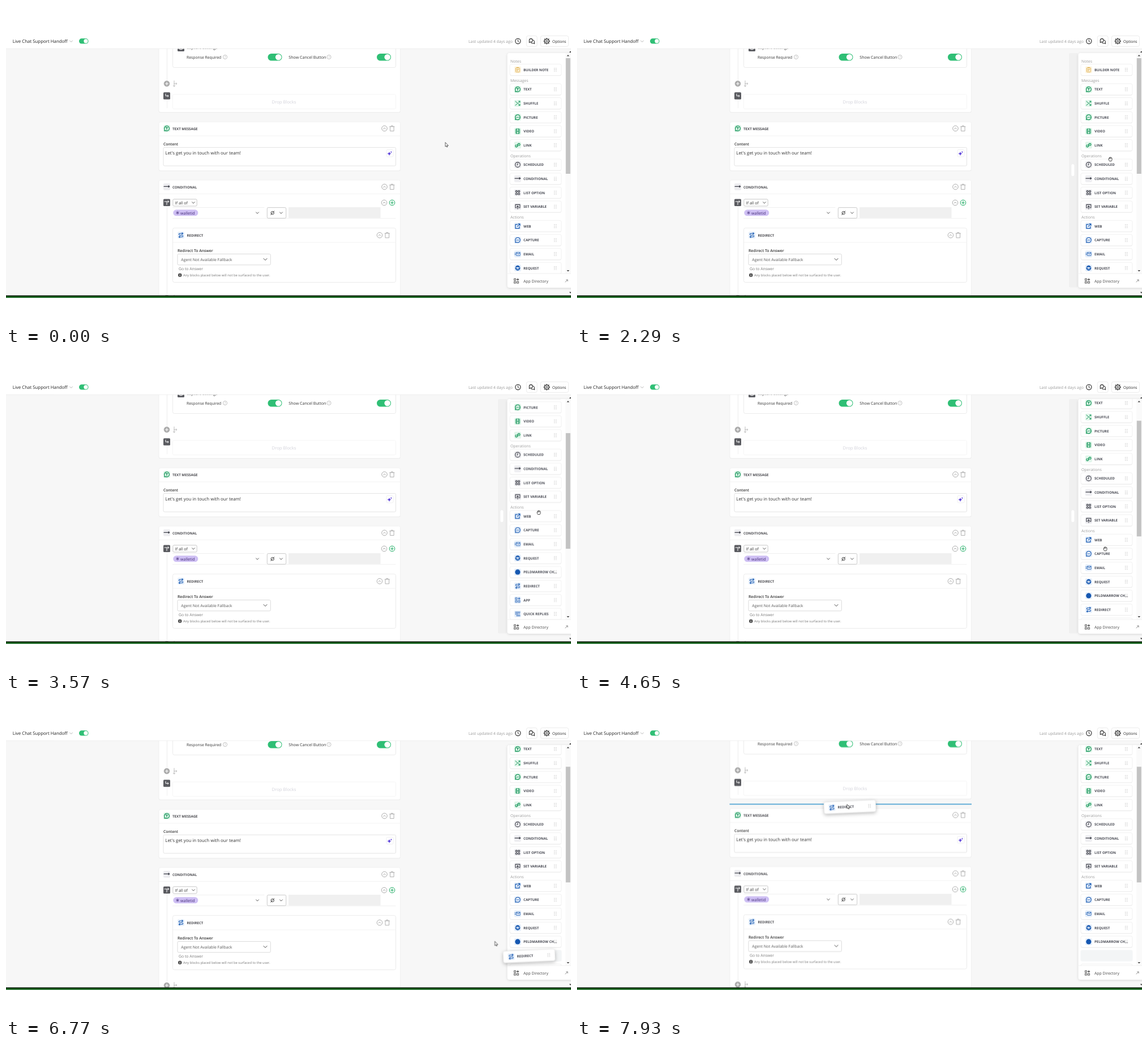
Recreate the animation shown at these times as an HTML page. Size 998 by 561 pixels, loop 8 s.

```html
<!DOCTYPE html>
<html lang="en">
<head>
<meta charset="utf-8">
<title>Flow builder</title>
<style>
  html, body { margin: 0; width: 100%; height: 100%; overflow: hidden; background: #fff; }
  svg { display: block; width: 100%; height: 100%; }
  text { font-family: "Open Sans", "Noto Sans", sans-serif; text-rendering: geometricPrecision; white-space: pre; }
  .line { fill: none; stroke-linecap: round; stroke-linejoin: round; }

  .anim { animation: 8s linear infinite; }
  .step { animation: 8s step-end infinite; }
  #page { animation-name: page; }
  #list { animation-name: list; }
  #thumb { animation-name: thumb; }
  #strip { animation-name: strip; }
  #grip { animation-name: grip; }
  #pointer { animation-name: pointer; }
  #ghost { animation-name: ghost; transform: translate(924px, 455px); }
  .arrow { animation-name: arrow; }
  .hand { animation-name: hand; }
  .grab { animation-name: grab; }
  .dragging { animation-name: dragging; }
  .resting { animation-name: resting; }
  #drop { animation-name: drop; }

  @keyframes page {
    0%, 83% { transform: translateY(0); }
    84%, 91% { transform: translateY(-8px); }
    92%, 100% { transform: translateY(-9.5px); }
  }
  @keyframes list {
    0%, 37% { transform: translateY(0); }
    38.125% { transform: translateY(-21px); }
    40%, 42.5% { transform: translateY(-57px); }
    44.625% { transform: translateY(-98.5px); }
    45.625%, 51.9% { transform: translateY(-114px); }
    54.4%, 100% { transform: translateY(-57px); }
  }
  @keyframes thumb {
    0%, 37% { transform: translateY(0); }
    38.125% { transform: translateY(10.8px); }
    40%, 42.5% { transform: translateY(29.3px); }
    44.625% { transform: translateY(51px); }
    45.625%, 51.9% { transform: translateY(59px); }
    54.4%, 100% { transform: translateY(29.3px); }
  }
  @keyframes strip {
    0%, 13% { opacity: 0; }
    14%, 83% { opacity: 1; }
    84%, 100% { opacity: 0; }
  }
  @keyframes grip {
    0%, 13.5% { opacity: 0; }
    15.1% { opacity: .5; }
    17%, 100% { opacity: 1; }
  }
  @keyframes pointer {
    0%, 3.125% { transform: translate(776px, 241px); animation-timing-function: ease-in-out; }
    14.5%, 16.5% { transform: translate(884px, 269px); animation-timing-function: ease-in-out; }
    24%, 39% { transform: translate(942px, 270px); }
    44.625%, 52% { transform: translate(941px, 283px); }
    58.125% { transform: translate(933px, 347px); }
    69%, 83% { transform: translate(921px, 452px); }
    84.625% { transform: translate(864px, 430px); }
    87.5% { transform: translate(740px, 355px); }
    91.25% { transform: translate(590px, 258px); }
    96.25%, 100% { transform: translate(477px, 188px); }
  }
  @keyframes ghost {
    0%, 84.8% { transform: translate(924px, 455px) rotate(-2.5deg); }
    88.5% { transform: translate(745px, 359px) rotate(-2.5deg); }
    92.25% { transform: translate(595px, 262px) rotate(-2.5deg); }
    97.25%, 100% { transform: translate(482px, 192px) rotate(-2.5deg); }
  }
  @keyframes arrow { 0% { opacity: 1; } 13.2% { opacity: 0; } 83.2%, 100% { opacity: 1; } }
  @keyframes hand { 0% { opacity: 0; } 13.2% { opacity: 1; } 18.5%, 100% { opacity: 0; } }
  @keyframes grab { 0% { opacity: 0; } 18.5% { opacity: 1; } 83.2%, 100% { opacity: 0; } }
  @keyframes dragging { 0% { opacity: 0; } 83.2%, 100% { opacity: 1; } }
  @keyframes resting { 0% { opacity: 1; } 83.2%, 100% { opacity: 0; } }
  @keyframes drop { 0% { opacity: 0; } 95%, 100% { opacity: 1; } }
</style>
</head>
<body>
<svg id="stage" viewBox="0 0 998 561" xmlns="http://www.w3.org/2000/svg"></svg>
<script>
const GREEN = '#16955a', BLUE = '#1557b0', DARK = '#3c3f48', GREY = '#9a9a9a';

const rect = (x, y, w, h, fill = '#fff', stroke = 'none', r = 0) =>
  `<rect x="${x}" y="${y}" width="${w}" height="${h}" rx="${r}" fill="${fill}" stroke="${stroke}" stroke-width=".8"/>`;
const dot = (x, y, r, fill, stroke = 'none', w = 1) =>
  `<circle cx="${x}" cy="${y}" r="${r}" fill="${fill}" stroke="${stroke}" stroke-width="${w}"/>`;
const line = (d, color = DARK, w = 1, fill = 'none') =>
  `<path class="line" d="${d}" stroke="${color}" stroke-width="${w}" style="fill:${fill}"/>`;
const text = (x, y, s, size, fill = '#333', weight = 400, anchor = 'start') =>
  `<text x="${x}" y="${y}" font-size="${size}" fill="${fill}" font-weight="${weight}" text-anchor="${anchor}">${s}</text>`;
const at = (x, y, body, attrs = '') => `<g transform="translate(${x} ${y})" ${attrs}>${body}</g>`;

// Glyphs are drawn around their own centre, about 10 units wide.
const bubble = 'M-4.2 4.2L-3.9 1.8A4.4 4.4 0 1 1 -1.8 3.9Z';
const squares = c => rect(-4, -4, 3, 3, 'none', c) + rect(-4, 1, 3, 3, 'none', c) +
  rect(1, 1, 3, 3, 'none', c) + line('M2.5 -4.2V-.8M.8 -2.5H4.2', c);
const glyphs = {
  note: c => rect(-3.5, -3.5, 7, 7.5, 'none', c, 1) + line('M-1.5 -4H1.5M-1.8 -.8H1.8M-1.8 1.5H.5', c),
  text: c => line(bubble, c, 1.2) + line('M-1.7 -1.6H1.7M0 -1.6V2', c, 1.2),
  shuffle: c => line('M-4 -3.5L4 3.5M-4 3.5L-1 1M1 -1L4 -3.5M1.8 -3.7H4V-1.6M1.8 3.7H4V1.6', c),
  picture: c => line(bubble, c, 1.2) + line('M-3.5 2L-1 -.5L.5 .8L2 -.6L4 .8', c),
  video: c => rect(-3.5, -4, 7, 8, 'none', c, 1) + line('M-1.8 -4V4M1.8 -4V4M-1.8 0H1.8', c, 1.2),
  link: c => line('M-.8 1.6A2 2 0 0 1 -.6 -1L1.5 -3.1A2 2 0 0 1 4 -.6L2.8 .7M.8 -1.6A2 2 0 0 1 .6 1L-1.5 3.1A2 2 0 0 1 -4 .6L-2.8 -.7', c, 1.2),
  clock: c => dot(0, 0, 4.4, 'none', c, 1.1) + line('M0 -2.4V.3H-1.6', c),
  cond: c => line('M-5 -.6H4.6M3 -2L4.8 -.6L3 .8', c, 1.2),
  list: c => [[-2.2, -2.2], [2.2, -2.2], [-2.2, 2.2], [2.2, 2.2]].map(([x, y]) => dot(x, y, 1.5, 'none', c, 1.2)).join(''),
  variable: c => line('M-1.8 2H-4V-3.6H4V2H1.8M0 4V-1.2M-1.5 .2L0 -1.4L1.5 .2', c, 1.1),
  web: c => line('M-.5 -3H-4V4H3V.8M1 -4H4V-1M4 -4L-.6 .6', c, 1.2),
  capture: c => line(bubble, c, 1.1) + [-1.9, 0, 1.9].map(x => dot(x, 0, .7, c)).join(''),
  email: c => rect(-2.5, -2.8, 6.8, 5.6, 'none', c, .6) + line('M-2.2 -2.4L.9 .2L4 -2.4M-5 -1.5H-3.8M-5 1H-3.8', c),
  request: c => dot(0, 0, 4.4, c) + line('M-3 -.8H3M-2 1.6H2', '#fff') + dot(0, -.6, 1.2, '#fff'),
  circle: c => dot(0, 0, 4.6, c),
  redirect: c => line('M-3.5 -1V-1.5A1.5 1.5 0 0 1 -2 -3H3.5M2 -4.4L3.6 -3L2 -1.6M3.5 1V1.5A1.5 1.5 0 0 1 2 3H-3.5M-2 1.6L-3.6 3L-2 4.4M-2.5 0H2.5', c, 1.1),
  app: squares,
  quick: c => line('M-4 -3H4M-4 0H1M-2 3H4', c, 1.3) + dot(3, 0, .8, c)
};
const badge = (x, y, name, color, tint) => at(x, y, rect(-6, -6, 12, 12, tint, 'none', 2) + glyphs[name](color));

const chevron = (x, y, color = '#444', s = 2.4) => line(`M${x - s} ${y - s / 2}l${s} ${s}l${s} ${-s}`, color, .9);
const help = (x, y) => dot(x, y, 3.6, 'none', '#aaa', .7) + text(x, y + 1.8, '?', 5, '#999', 400, 'middle');
const toggle = (x, y, w, h) => rect(x, y, w, h, '#2fbf75', 'none', h / 2) + dot(x + w - h / 2, y + h / 2, h / 2 - 1, '#fff');
const collapse = (x, y) => dot(x, y, 4.8, 'none', GREY, .8) + line(`M${x - 2} ${y + 1}l2 -2l2 2`, GREY, .9);
const trash = (x, y) => line(`M${x - 4.2} ${y - 3.2}h8.4M${x - 1.5} ${y - 3.4}v-1.3h3v1.3M${x - 3.3} ${y - 3}v7.6h6.6v-7.6`, '#aaa', .9);
const actions = (x, y) => collapse(x, y) + trash(x + 13.3, y);
const plus = (x, y, fill, color) => dot(x, y, 4.8, fill, color, 1) + line(`M${x - 2.4} ${y}h4.8M${x} ${y - 2.4}v4.8`, fill === '#fff' ? color : '#fff', 1.1);
const branch = (x, y) => line(`M${x - 1.5} ${y - 5}v10M${x - 3} ${y + 3.5}l1.5 1.6l1.5 -1.6M${x - 1.5} ${y}h4.5M${x + 1.8} ${y - 1.4}l1.5 1.4l-1.5 1.4`, '#aaa', .8);
const block = (y, h) => rect(269.7, y + .8, 427, h, '#e9e9e9', 'none', 3) + rect(270, y, 426.5, h, '#fff', '#efefef', 3);
const darkBox = (y, d) => rect(278, y, 12, 12.5, '#5a5b60', 'none', 1.5) + at(284, y + 6, line(d, '#fff', 1));

const page = () =>
  block(40, 147.5) + rect(294.5, 40, 394, 68.5, '#fff', '#e6e6e6', 3) +
  rect(303, 68, 12, 12, '#5a5b60', 'none', 1.5) + dot(309, 74, 3, 'none', '#fff') +
  text(319, 76, 'Capture Settings', 6.8, '#444', 600) +
  text(319, 92.6, 'Response Required', 6.8) + help(387, 90) + toggle(462.5, 84, 25, 12.6) +
  text(499.3, 92.6, 'Show Cancel Button', 7.1) + help(570.5, 90) + toggle(655, 84, 25, 12.6) +
  line('M284.5 60V131', '#ececec') + plus(284, 137, '#ababab', '#ababab') + branch(298.5, 137) +
  line('M284.5 165V180', '#f0f0f0') + darkBox(152.2, 'M-2 -3V.5H3M1.4 -1L3 .5L1.4 2') +
  rect(294.5, 156, 394, 25.5, '#fff', '#f3f3f3', 2) + text(491, 172.4, 'Drop Blocks', 7.7, '#d2d2da', 400, 'middle') +

  block(204.5, 86) + line('M270 229H696', '#f0f0f0', .8) + badge(284, 216, 'text', GREEN, '#e2f6eb') +
  text(294, 218.6, 'TEXT MESSAGE', 6.2, '#4b4b50', 700) + actions(668.5, 216) +
  text(278, 245.5, 'Content', 6.7, '#333', 600) + rect(278, 249.5, 410.5, 32.5, '#fff', '#dedede', 2) +
  text(281.3, 261.6, "Let's get you in touch with our team!", 7.9) +
  rect(672, 253.5, 12, 12.5, '#fff', '#ececec', 2) +
  '<path d="M677 257l1 2.6l2.6 1l-2.6 1l-1 2.6l-1 -2.6l-2.6 -1l2.6 -1zM680.3 256l.5 1.2l1.2 .5l-1.2 .5l-.5 1.2l-.5 -1.2l-1.2 -.5l1.2 -.5z" fill="#5236d8"/>' +

  block(307, 260) + line('M270 331.5H696', '#f0f0f0', .8) + badge(284, 319, 'cond', DARK, '#ededf0') +
  text(294, 321.8, 'CONDITIONAL', 6.1, '#4b4b50', 700) + actions(668.5, 319) +
  line('M284.5 353V508', '#ececec') + darkBox(340.5, 'M-4 -1.5H3.5M2 -3L3.8 -1.5L2 0M0 -1V4') +
  rect(294.8, 340.8, 42.4, 12.2, '#fff', '#bbb', 2) + text(298.8, 349.5, 'If all of', 7) + chevron(331, 347) +
  collapse(668, 347) + plus(682, 347, '#fff', '#22ad66') +
  line('M294.5 355.5H456M294.5 374.8H688', '#ededed', .8) +
  rect(295.3, 359.3, 44, 11, '#cfc0f4', 'none', 5.5) +
  line('M303 362.2V367.4M300.7 363.5L305.3 366.1M305.3 363.5L300.7 366.1', '#4b347f', .8) +
  text(308, 367.5, 'walletid', 7.1, '#47307a') + chevron(444, 365) +
  rect(461.3, 355.6, 33.4, 18.8, '#fff', '#bbb', 2) + dot(470.7, 365, 2.7, 'none', '#333', .9) +
  line('M467.6 368.3L473.8 361.7', '#333', .9) + chevron(486, 365) + rect(499, 355, 162.5, 19, '#f0f0f0') +

  rect(294.5, 391.7, 394, 95.8, '#fff', '#e6e6e6', 3) + line('M295 417H688', '#f0f0f0', .8) +
  badge(309, 404.3, 'redirect', BLUE, '#e6effa') + text(319.5, 406.8, 'REDIRECT', 6.1, '#4b4b50', 700) + actions(660, 404.3) +
  text(303, 433.8, 'Redirect To Answer', 6.8, '#333', 600) + rect(303, 437.5, 164.3, 19.3, '#fff', '#d2d2d2', 2) +
  text(309.3, 450, 'Agent Not Available Fallback', 6.86, '#555') + chevron(458, 447, '#333', 3) +
  text(305, 465.8, 'Go to Answer', 6.85, '#777') + dot(307.2, 474.8, 3.2, '#4a4a4a') +
  line('M307.2 474.4V476.4M307.2 473V473', '#fff', .9) +
  text(313, 477, 'Any blocks placed below will not be surfaced to the user.', 5.85, '#777') +
  plus(284, 515, '#ababab', '#ababab') + branch(298.5, 514.7);

const grips = Array.from({ length: 6 }, (_, i) => dot(33.2 + (i % 2) * 3, -2.6 + (i >> 1) * 2.6, .65, '#b5b5b5')).join('');
const card = (label, icon, color, tint) =>
  rect(-45.5, -8.8, 91, 19.6, '#ebebeb', 'none', 3) + rect(-45.5, -10, 91, 20, '#fff', '#eee', 3) +
  (icon ? badge(-31.7, 0, icon, color, tint) + text(-21.5, 2.4, label, 6.1, '#4a4c55', 700) + grips : '');

const sections = [
  ['Notes', 99.5, 112.5, '#dba53a', '#fdf5e1', [['BUILDER NOTE', 'note']]],
  ['Messages', 134, 147, GREEN, '#e2f6eb',
    [['TEXT', 'text'], ['SHUFFLE', 'shuffle'], ['PICTURE', 'picture'], ['VIDEO', 'video'], ['LINK', 'link']]],
  ['Operations', 267, 280, DARK, '#eeeef1',
    [['SCHEDULED', 'clock'], ['CONDITIONAL', 'cond'], ['LIST OPTION', 'list'], ['SET VARIABLE', 'variable']]],
  ['Actions', 375.3, 388.3, BLUE, '#e6effa',
    [['WEB', 'web'], ['CAPTURE', 'capture'], ['EMAIL', 'email'], ['REQUEST', 'request'], ['PELDMARROW CH...', 'circle'],
     ['REDIRECT', 'redirect'], ['APP', 'app'], ['QUICK REPLIES', 'quick'], ['', '']]]
];
const list = () => sections.map(([title, titleY, top, color, tint, items]) =>
  text(891, titleY, title, 6.9, GREY) +
  items.map(([label, icon], i) => {
    const y = top + i * 24.65, held = label === 'REDIRECT';
    return (held ? at(935.5, y, rect(-46, -10, 92, 20, '#f3f5f6', 'none', 3), 'class="step dragging"') : '') +
      at(935.5, y, `<g class="${held ? 'step resting' : ''}">${card(label, icon, color, tint)}</g>`);
  }).join('')).join('');

const triangle = (x, y, d) => `<path d="M${x - 2.3} ${y + d}h4.6l-2.3 ${-2.4 * d}z" fill="#444"/>`;
const panel = () =>
  rect(885.5, 83, 120, 414, '#fff', 'none', 4).replace('/>', ' style="filter:drop-shadow(0 1px 2px #0002)"/>') +
  `<g clip-path="url(#listClip)"><g id="list" class="anim">${list()}</g></g>` +
  rect(988, 83, 10, 389, '#fafafa') + triangle(992.8, 87.5, 1) + triangle(992.8, 467, -1) +
  `<g id="thumb" class="anim">${rect(988.8, 92, 8, 204, '#c3c3c3')}</g>` +
  rect(886, 472, 112, 24.5, '#fff', 'none', 3) + line('M886 472H998', '#eee', .8) +
  at(901.5, 485, squares('#333')) + text(914, 487.5, 'App Directory', 6.86, '#444') +
  line('M988 487l4 -4M989.5 483h2.6v2.6', '#777', .8) + triangle(997, 81, 1) + triangle(997, 505.5, -1);

const gearTeeth = Array.from({ length: 8 }, (_, i) => {
  const c = Math.cos(i * Math.PI / 4), s = Math.sin(i * Math.PI / 4);
  return `M${4 * c} ${4 * s}L${5.1 * c} ${5.1 * s}`;
}).join('');
const header = () =>
  rect(0, 0, 998, 75) + line('M0 75.3H998', '#ededed', .8) +
  text(11.8, 65.2, 'Live Chat Support Handoff', 7.87, '#222') + chevron(115, 62.3, '#aaa') + toggle(129, 57.3, 16.6, 9.2) +
  text(817, 64.8, 'Last updated 4 days ago', 6.9, GREY) + dot(904.3, 62, 4.6, '#fff', '#333', 1.2) +
  line('M904.3 59.3V62.4L906.2 63.4', '#333') +
  rect(919.3, 52.6, 18.8, 18.8, '#fff', '#e6e6e6', 3) +
  line('M924.3 64.6V60.4A3 3 0 0 1 927.3 57.6A3.2 3.2 0 0 1 930.3 60.6A3 3 0 0 1 927.3 63.5H926Z', '#333', 1.1) +
  line('M931.2 60.2A3 3 0 0 1 933.4 63V66.6L931.8 65.8H930A2.8 2.8 0 0 1 927.6 64.6', '#333', 1.1) +
  rect(944.3, 52.6, 49.2, 18.8, '#fff', '#e6e6e6', 3) +
  at(955.2, 62, dot(0, 0, 4, 'none', '#333', 1.2) + dot(0, 0, 1.6, 'none', '#333') + line(gearTeeth, '#333', 1.5)) +
  text(965, 64.6, 'Options', 6.6, '#222');

const cursor = () =>
  `<g class="step arrow">${line('M0 0V7.2L1.7 5.7L2.8 8L3.9 7.5L2.8 5.3H5Z', '#222', .7, '#fff')}</g>` +
  `<g class="step hand">${line('M-1.2 1V-3.6A.7 .7 0 0 1 .2 -3.6V-1L3 -.3V2.5L2 4.5H-1.2L-3.2 1.2L-2.4 .4Z', '#222', .8, '#fff')}</g>` +
  `<g class="step grab">${line('M-2.8 1L-3 -.4L-2 -.2V-2.4L-.9 -2.6L-.6 -3.2L.5 -3.2L.9 -2.6L2 -2.4L3 -1.6V1.4L2 3.6H-1.2ZM-.8 -2.4V-.6M1 -2.4V-.6', '#222', .8, '#fff')}</g>`;

document.getElementById('stage').innerHTML =
  `<defs>
    <clipPath id="pageClip"><rect x="0" y="75" width="998" height="435.5"/></clipPath>
    <clipPath id="listClip"><rect x="886" y="83" width="102" height="389"/></clipPath>
  </defs>` +
  rect(0, 0, 998, 561) + rect(0, 75, 998, 436, '#f7f7f7') +
  `<g clip-path="url(#pageClip)"><g id="page" class="anim">${page()}</g></g>` +
  header() +
  `<g id="strip" class="anim">${rect(869, 83, 15.5, 413.5, '#f0f0f0', 'none', 2)}
    <g id="grip" class="anim">${rect(873.3, 279, 5, 21, '#fff', 'none', 2.5)}</g></g>` +
  panel() +
  rect(0, 510.5, 998, 1.8, '#071a09') + rect(0, 512, 998, 2.8, '#0b5c17') +
  `<g id="drop" class="step">${rect(269.5, 186.4, 427.5, 1.9, '#5eabd6')}</g>` +
  `<g class="step dragging"><g id="ghost" class="anim">
    <g style="filter:drop-shadow(0 2px 3px #0004)">${card('REDIRECT', 'redirect', BLUE, '#e6effa')}</g></g></g>` +
  `<g id="pointer" class="anim">${cursor()}</g>`;
</script>
</body>
</html>
```
